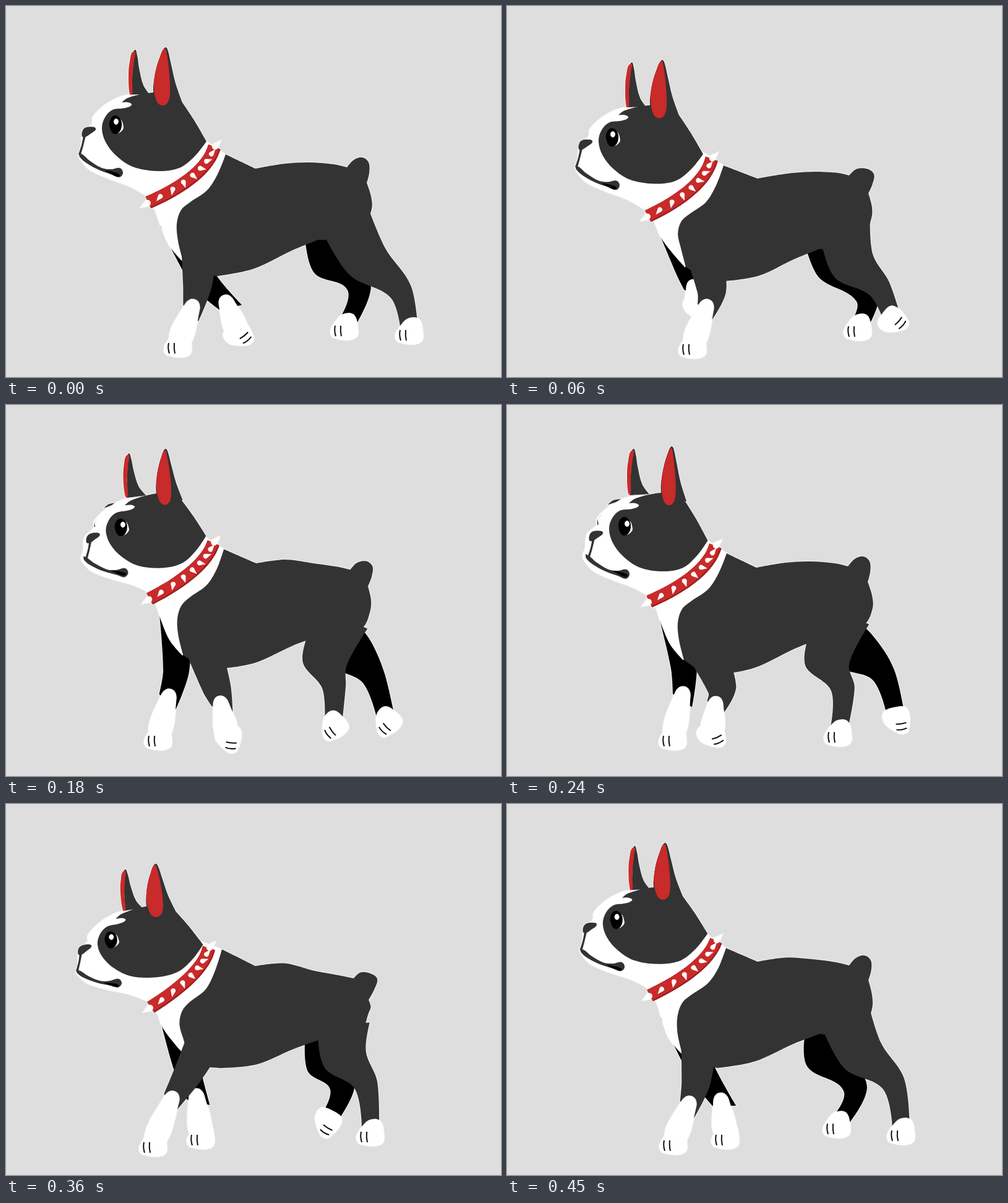
Write an HTML page that moves like this. It is 800x600 px and loops after 480 ms.

```html
<!DOCTYPE html>
<html lang="en">
<head>
<meta charset="utf-8">
<title>Walking dog</title>
<style>
html, body { margin: 0; width: 100%; height: 100%; overflow: hidden; background: #dedede; }
svg { display: block; width: 100vw; height: 100vh; }
</style>
</head>
<body>
<svg viewBox="0 0 800 600">
  <use href="#dog" stroke="#f2f2f2" stroke-width="2"/>
  <g id="dog"></g>
</svg>
<script>
const LOOP = 480, STEP = 30, BOB = 240;
const DARK = '#333', RED = '#c92a2a', SHADE = '#9b1f22', WHITE = '#fff', BLACK = '#000';
const dog = document.getElementById('dog');
const updates = [];

function make(tag, parent, attrs) {
  const el = document.createElementNS('http://www.w3.org/2000/svg', tag);
  for (const k in attrs) el.setAttribute(k, attrs[k]);
  return parent.appendChild(el);
}

// "x,y" pairs; a trailing "c" marks a sharp corner.
function parse(text) {
  const words = text.split(' ');
  return { pts: words.map(w => w.split(',').map(parseFloat)), sharp: words.map(w => w.endsWith('c')) };
}

// Periodic monotone cubic through poses keyed by time.
function track(poses, period) {
  const T = Object.keys(poses).map(Number).sort((a, b) => a - b), n = T.length;
  const V = T.map(k => poses[k]);
  const at = i => (i + n) % n;
  const gap = i => (T[at(i + 1)] - T[at(i)] + period) % period;
  const slope = (i, k) => (V[at(i + 1)][k] - V[at(i)][k]) / gap(i);
  const tangent = (i, k) => {
    const a = slope(i - 1, k), b = slope(i, k);
    return a * b <= 0 ? 0 : 2 * a * b / (a + b);
  };
  return time => {
    const t = time % period;
    let i = n - 1;
    while (T[i] > t) i--;
    const h = gap(i), s = (t - T[i]) / h, r = 1 - s;
    return V[i].map((a, k) => a * r * r * (1 + 2 * s) + V[at(i + 1)][k] * s * s * (3 - 2 * s)
      + h * s * r * (tangent(i, k) * r - tangent(i + 1, k) * s));
  };
}

// Closed smooth path through points.
function outline(pts, sharp) {
  const n = pts.length, P = i => pts[(i + n) % n];
  const handle = (i, len) => {
    if (sharp[i % n]) return [0, 0];
    const p = P(i - 1), q = P(i + 1), dx = q[0] - p[0], dy = q[1] - p[1];
    const m = len / 3 / (Math.hypot(dx, dy) || 1);
    return [dx * m, dy * m];
  };
  const f = v => v.toFixed(1);
  let d = 'M' + pts[0].map(f);
  for (let i = 0; i < n; i++) {
    const p = P(i), q = P(i + 1), len = Math.hypot(q[0] - p[0], q[1] - p[1]);
    const u = handle(i, len), v = handle(i + 1, len);
    d += 'C' + [p[0] + u[0], p[1] + u[1], q[0] - v[0], q[1] - v[1], q[0], q[1]].map(f);
  }
  return d + 'Z';
}

// Tapered strip along a chain of joints; "tail" lengthens its rear edge.
function strip(joints, front, back = front, tail = 0, round = false) {
  const n = joints.length, a = [], b = [];
  joints.forEach(([x, y], i) => {
    const p = joints[Math.max(i - 1, 0)], q = joints[Math.min(i + 1, n - 1)];
    const len = Math.hypot(q[0] - p[0], q[1] - p[1]) || 1;
    const dx = (q[0] - p[0]) / len, dy = (q[1] - p[1]) / len, more = i === n - 1 ? tail : 0;
    a.push([x - dy * front[i], y + dx * front[i]]);
    b.unshift([x + dy * back[i] + dx * more, y - dx * back[i] + dy * more]);
  });
  const sharp = a.concat(b).map((_, i) => !round && (i % n === 0 || i % n === n - 1));
  return outline(a.concat(b), sharp);
}

// Body handles: rest place, then offsets at 60, 120 and 210 ms.
const HANDLES = [
  [337, 228, -6, 19, -9, 5, 1, -7],      // collar top
  [303, 275, -4, 20, -3, 3, 0, -9],      // collar middle
  [230, 318, -2, 22, 4, 11, 1, -8],      // collar bottom
  [355, 240, -5, 18, -6, -5, -1, -7],    // neck
  [403, 263, 2, 16, 0, -1, 2, -8],       // withers
  [551, 261, 2, 13, 11, 21, 2, 0],       // tail base
  [586, 253, 7, 19, 14, 30, 2, 0],       // tail tip
  [583, 286, 1, 17, 3, 31, 1, -1],       // tail root
  [590, 330, -2, 15, -5, 10, -1, 3],     // rump
  [340, 437, 13, 8, 8, -10, 0, -10],     // belly front
  [470, 392, 0, 15, 0, 2, 0, -7],        // belly rear
  [285, 413, 3, 10, 10, 0, -3, -9]       // chest
];
const offsets = track(Object.fromEntries(
  [0, 60, 120, 210].map((t, i) => [t, HANDLES.flatMap(h => i ? h.slice(2 * i, 2 * i + 2) : [0, 0])])), BOB);
let moved;

// Each point follows the handles nearest to it.
function warp([x, y]) {
  let sx = 0, sy = 0, sum = 0;
  HANDLES.forEach(([hx, hy], i) => {
    const w = ((x - hx) ** 2 + (y - hy) ** 2 + 4) ** -1.5;
    sx += w * moved[2 * i];
    sy += w * moved[2 * i + 1];
    sum += w;
  });
  return [x + sx / sum, y + sy / sum];
}

function flesh(fill, text) {
  const { pts, sharp } = parse(text), el = make('path', dog, { fill });
  updates.push(() => el.setAttribute('d', outline(pts.map(warp), sharp)));
}

const FOOT = parse('-17,18 -23,7 -14,-10 -2,-21 14,-21 21,-6 18,18');
const FORE = { half: [30, 23, 15], sock: true }, HIND = { half: [42, 36, 19, 14] };

// Pose: knee x,y, cuff or hock x,y, foot x,y, foot angle.
function leg(fill, hip, kind, poses) {
  const limb = make('path', dog, { fill });
  const sock = kind.sock && make('path', dog, { fill: WHITE });
  const paw = make('g', dog, {});
  make('path', paw, { fill: WHITE, d: outline(FOOT.pts, FOOT.sharp) });
  make('path', paw, { d: 'M-15,-2q-2,8 1,17M-6,-2q-1,9 1,17', fill: 'none', stroke: '#111', 'stroke-width': 2 });
  const pose = track(poses, LOOP);
  updates.push(t => {
    const [kx, ky, cx, cy, fx, fy, angle] = pose(t);
    const chain = [warp(hip), [kx, ky], [cx, cy]];
    if (sock) {
      const len = Math.hypot(fx - cx, fy - cy) / 12;
      const top = [cx - (fx - cx) / len, cy - (fy - cy) / len];
      sock.setAttribute('d', strip([top, [cx, cy], [fx, fy]], [6, 13, 16], undefined, 0, true));
    } else chain.push([fx, fy]);
    limb.setAttribute('d', strip(chain, kind.half, kind.half, sock ? 20 : 0));
    paw.setAttribute('transform', `translate(${fx} ${fy}) rotate(${angle})`);
  });
}

leg(BLACK, [525, 370], HIND, {
  0: [530, 415, 571, 457, 547, 519, 0],
  60: [535, 420, 583, 472, 567, 520, 0],
  120: [548, 408, 580, 448, 590, 514, 0],
  240: [568, 400, 609, 437, 630, 510, -95],
  300: [558, 400, 583, 430, 594, 496, -110],
  360: [523, 425, 543, 463, 518, 515, -55],
  450: [518, 410, 563, 462, 533, 519, 0]
});
leg(BLACK, [272, 345], { half: [25, 21, 16], sock: true }, {
  0: [318, 440, 356, 480, 376, 532, -125],
  60: [295, 430, 302, 455, 308, 487, -100],
  120: [275, 415, 272, 440, 256, 483, -65],
  180: [275, 430, 263, 472, 246, 537, 0],
  240: [286, 425, 284, 468, 268, 537, 0],
  300: [290, 435, 306, 485, 303, 537, 0],
  360: [292, 425, 308, 473, 315, 537, 0],
  450: [318, 437, 346, 480, 353, 537, 0]
});

// Neck, then torso with tail
flesh(WHITE, '323,218c 355,240c 320,340c 285,413c 264,388 249,354 240,328 226,306c');
flesh(DARK, '355,240c 403,263c 450,255 490,253 530,256 551,261c 562,249 576,245 586,253 587,270 583,286c 590,308 591,328 579,354 540,376 505,378c 463,395 400,425 340,437c 310,428 286,412c 278,380 276,352 283,330 298,317 325,298 342,272');

leg(DARK, [546, 340], HIND, {
  0: [584, 413, 638, 462, 652, 526, 0],
  60: [560, 420, 602, 457, 624, 510, -135],
  120: [514, 415, 524, 455, 526, 507, -90],
  240: [517, 418, 543, 460, 535, 531, 0],
  300: [540, 418, 563, 462, 556, 531, 0],
  360: [548, 413, 582, 455, 589, 532, 0],
  450: [575, 407, 625, 453, 637, 530, 0]
});
leg(DARK, [313, 385], FORE, {
  0: [309, 454, 301, 487, 278, 547, 0],
  60: [331, 463, 322, 487, 300, 549, 0],
  120: [333, 452, 329, 485, 321, 549, 0],
  210: [345, 460, 352, 483, 368, 535, -110],
  240: [348, 460, 337, 484, 331, 534, -110],
  300: [310, 446, 288, 470, 269, 528, -65],
  360: [292, 440, 268, 477, 238, 549, 0],
  450: [305, 452, 294, 485, 269, 546, 0]
});

// Head: a leaning group whose features slide as it turns to the viewer.
const head = make('g', dog, {});
const turn = track({ 0: [0], 60: [0], 120: [.55], 240: [1], 300: [1.1], 360: [0], 450: [0] }, LOOP);
const nod = track({ 0: [0, 0, 0], 60: [-7, 20.5, 0], 120: [-6.5, 32, 1], 210: [0, -3.5, .25] }, BOB);
updates.push(t => {
  const [x, y, lean] = nod(t), skew = .07 * lean, tilt = -.115 * lean, squash = -.09 * lean;
  head.setAttribute('transform',
    `matrix(1 ${tilt} ${skew} ${1 + squash} ${x - 205 * skew} ${y - 130 * tilt - 205 * squash})`);
});

// Points near the nape stay put; "grow" parts appear only while turning.
function face(fill, dx, dy, text, grow) {
  const { pts, sharp } = parse(text), el = make('path', head, { fill });
  const [ox, oy] = pts[0];
  updates.push(t => {
    const k = turn(t)[0], size = grow ? k : 1;
    el.setAttribute('d', outline(pts.map(([x, y]) => {
      const w = k * Math.min(1, Math.max(0, (330 - x) / 120));
      return [ox + (x - ox) * size + dx * w, oy + (y - oy) * size + dy * w];
    }), sharp));
  });
}

// Far ear, skull and jaw
face(DARK, -4, 0, '202,146c 204,115 205,85 208,71 212,80 215,100 222,128 233,144c');
face(RED, -4, 0, '207,73 200,90 198,115 200,143 204,145 204,115 207,88');
face(WHITE, 5, 4, '216,143c 190,145 167,155 150,168 140,180 139,190 124,205 121,228 117,240 121,250 135,265 165,279 200,292 228,308c 300,270c 324,219c 260,150c');
// Far eye patch and brow
face(DARK, 6, 4, '140,183c 146,174 141,182 141,190', true);
face(DARK, 6, 2, '157,159c 166,152 178,150c 170,155', true);
// Near patch with the back of the head, near ear
face(DARK, 10, 3, '216,143c 196,149 187,156c 198,156 203,160 192,165 172,168 160,180 155,198 161,220 178,242 205,260 245,267 280,262 305,243 324,219c 303,183 285,156c 262,140 238,140');
face(DARK, 14, 0, '239,150c 238,130 243,100 251,77 257,67 261,70 267,95 274,125 285,156c');
face(RED, 14, 2, '256,69 248,85 241,108 239,133 244,155 253,161 262,155 265,138 264,110 260,78');
// Eye
face(WHITE, 13, 4, '183,183 190,196 186,203 178,206 172,200');
face(BLACK, 13, 4, '167,192 170,181 177,177 185,183 187,194 182,205 173,206');
face(WHITE, 16, 5, '178,182 182,187 178,192 174,187');
// Nose, its line and the mouth
face(DARK, 10, 8, '123,211 124,201 130,196 143,196 145,200 136,207 128,212');
face(DARK, 13, 6, '125,210c 129,210c 125,226 121,240c 117,240c 122,225');
face(DARK, 9, 4, '118,237c 125,241 135,250 155,262 170,264 184,262 189,270 183,277 172,273 150,265 130,254 119,244');
face(BLACK, 11, 2, '160,266c 172,268 184,273 180,276 170,272');

// Collar along a curve through its three handles
const strap = make('path', dog, { fill: SHADE }), face1 = make('path', dog, { fill: RED });
const SPIKES = 7, spikes = [];
function spike(u, angle, size, push) {
  const el = make('path', dog, { d: 'M8,0L-2,-4A4,4 0 0 0 -2,4Z', fill: WHITE });
  spikes.push({ el, u, angle, size, push });
}
for (let i = 0; i < SPIKES; i++) spike(.1 + .133 * i, -50 + 30 * i, 1, 0);
spike(0, -45, 1.3, 4);
spike(1, 148, 1.3, 4);

updates.push(() => {
  const [top, mid, low] = HANDLES.slice(0, 3).map(warp);
  const at = u => top.map((a, k) => {
    const c = 2 * mid[k] - (a + low[k]) / 2;
    return a * (1 - u) ** 2 + 2 * c * u * (1 - u) + low[k] * u * u;
  });
  const line = Array.from({ length: 9 }, (_, i) => at(i / 8));
  strap.setAttribute('d', strip(line, line.map(() => 10.5)));
  face1.setAttribute('d', strip(line, line.map(() => 10.5), line.map(() => 8)));
  for (const { el, u, angle, size, push } of spikes) {
    const [x, y] = at(u);
    el.setAttribute('transform', `translate(${x} ${y}) rotate(${angle}) translate(${push}) scale(${size})`);
  }
});

function draw(time) {
  const t = Math.floor(time % LOOP / STEP) * STEP;
  moved = offsets(t);
  updates.forEach(u => u(t));
}
const start = performance.now();
function tick() {
  draw(performance.now() - start);
  requestAnimationFrame(tick);
}
draw(0);
requestAnimationFrame(tick);
</script>
</body>
</html>
```
